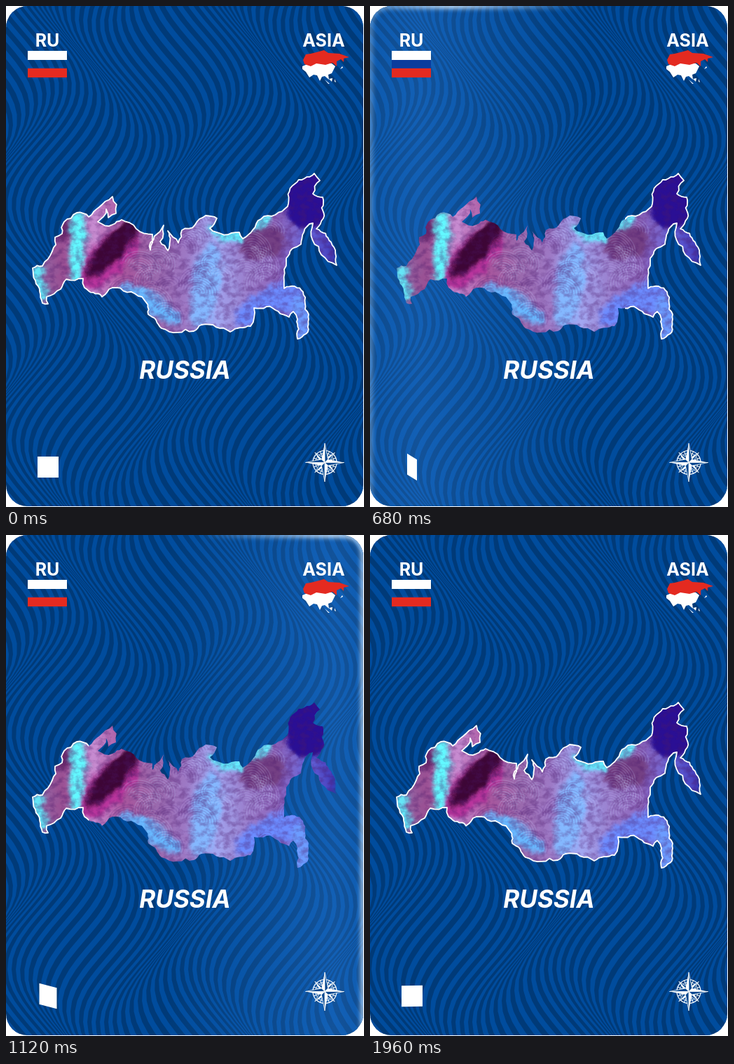
These frames come from a looping animation (511 px wide and 715 px high, 2000 ms). An HTML page:

```html
<!DOCTYPE html>
<html lang="en">
<head>
<meta charset="utf-8">
<title>Country card</title>
<style>
  html, body { margin: 0; width: 100%; height: 100%; overflow: hidden; background: #fff; }
  svg { display: block; position: absolute; left: 0; top: 0; }
  text { font-family: Montserrat, Inter, "Open Sans", sans-serif; font-weight: 700; fill: #fff; text-anchor: middle; }
</style>
</head>
<body>
<svg width="511" height="715" viewBox="0 0 511 715">
  <defs>
    <clipPath id="cardClip"><rect width="510" height="714" rx="31"/></clipPath>
    <clipPath id="landClip"><path class="coast"/></clipPath>
    <clipPath id="wipe"><rect id="wipeBox" y="220" height="270"/></clipPath>
    <linearGradient id="sheen" gradientUnits="userSpaceOnUse" y1="0" y2="0">
      <stop offset="0" stop-color="#4a9cff" stop-opacity="0"/>
      <stop offset=".5" stop-color="#4a9cff" stop-opacity=".25"/>
      <stop offset="1" stop-color="#4a9cff" stop-opacity="0"/>
    </linearGradient>
    <linearGradient id="rim" gradientUnits="userSpaceOnUse" y1="0" y2="0">
      <stop offset="0" stop-color="#cfe8ff" stop-opacity="0"/>
      <stop offset=".5" stop-color="#e4f3ff" stop-opacity=".95"/>
      <stop offset="1" stop-color="#cfe8ff" stop-opacity="0"/>
    </linearGradient>
    <linearGradient id="tones"></linearGradient>
    <filter id="soft" filterUnits="userSpaceOnUse" x="-20" y="-20" width="551" height="755">
      <feGaussianBlur stdDeviation="3"/>
    </filter>
    <filter id="marble" filterUnits="userSpaceOnUse" x="10" y="210" width="490" height="290" color-interpolation-filters="sRGB">
      <feGaussianBlur stdDeviation="3" result="blur"/>
      <feTurbulence type="fractalNoise" baseFrequency=".05" numOctaves="4" seed="7"/>
      <feDisplacementMap in="blur" scale="16" xChannelSelector="R" yChannelSelector="G"/>
    </filter>
    <filter id="grain" filterUnits="userSpaceOnUse" x="30" y="230" width="450" height="255" color-interpolation-filters="sRGB">
      <feTurbulence type="fractalNoise" baseFrequency=".1 .13" numOctaves="3" seed="12"/>
      <feColorMatrix values="0 0 0 0 .3  0 0 0 0 .1  0 0 0 0 .42  3 0 0 0 -1.2"/>
    </filter>
  </defs>

  <g clip-path="url(#cardClip)">
    <rect width="510" height="714" fill="#003a78"/>
    <path id="waves" fill="#004c9d"/>
    <rect width="510" height="714" fill="url(#sheen)"/>
    <path d="M0 714V31Q0 0 31 0H479Q510 0 510 31V714" fill="none" stroke="url(#rim)" stroke-width="7" filter="url(#soft)"/>
  </g>

  <text x="59" y="58" font-size="25">RU</text>
  <text x="453.5" y="58" font-size="25">ASIA</text>
  <text x="255.5" y="531.5" font-size="35" font-style="italic">RUSSIA</text>

  <path d="M31 64h56v13H31z" fill="#fff"/>
  <path id="flagBand" d="M31 77h56v12H31z" fill="#0b3c9d"/>
  <path d="M31 89h56v13H31z" fill="#e42a20"/>

  <path fill="#fff" d="M423 86l12-5 30 1 5 4-5 10-5 2 1 7-6-5-4 1-3 6-4-8-5-1-6 4-5-8-5-4z
    M456 103l6 5M461 104l5-1-1 5zM455 105l7 6-2 0zM469 104l2 5-2-1zM477 90l3-4 1 2zM463 111l7 0"/>
  <path fill="#e42a20" d="M424 77l4-8 7-1 8-2 11-3 6 4 16 1 14 5-8 2 0 5-4-4-6 3 0 7-6-5-10 3-13-2-8 4-9-3z"/>

  <g clip-path="url(#landClip)">
    <g id="paint" filter="url(#marble)">
      <rect x="38" y="220" width="435" height="270" fill="url(#tones)"/>
    </g>
    <g id="ridges" fill="none" stroke-width="1.2"></g>
    <rect x="30" y="230" width="450" height="255" filter="url(#grain)" opacity=".35"/>
  </g>
  <path class="coast" clip-path="url(#wipe)" fill="none" stroke="#fff" stroke-width="1.8" stroke-linejoin="round"/>

  <rect id="badge" x="-15" y="-15" width="30" height="30" fill="#fff"/>
  <g id="compass" transform="translate(455 651.5)"></g>
</svg>

<script>
const LOOP = 2000, STEP = 40, TAU = Math.PI * 2;
const $ = id => document.getElementById(id);

function add(parent, tag, attrs) {
  const el = document.createElementNS("http://www.w3.org/2000/svg", tag);
  for (const key in attrs) el.setAttribute(key, attrs[key]);
  parent.appendChild(el);
  return el;
}

function seeded(seed) {
  return () => (seed = (seed * 16807) % 2147483647) / 2147483647;
}

// Main capes and bays, clockwise from the west; roughen() adds the small coves
const capes = `38,374 52,371 66,350 70,330 80,325 83,308 101,295 118,301 133,287 152,272 157,296
  146,302 143,290 131,308 152,312 165,305 209,326 206,348 225,313 220,336 231,349 231,321 246,338
  251,320 285,299 301,303 291,317 333,323 338,332 364,304 402,286 412,254 440,239 448,249 438,268
  452,273 453,303 443,318 464,337 472,370 450,355 438,310 421,340 400,360 397,403 412,400 424,408
  432,440 428,468 416,475 416,447 410,436 404,444 372,429 354,431 349,457 320,465 279,455 268,464
  222,460 203,440 194,415 152,402 137,415 112,402 110,389 86,390 78,404 58,415 60,425 52,424 42,392`;

function roughen(a, b, random) {
  const dx = b[0] - a[0], dy = b[1] - a[1];
  if (Math.hypot(dx, dy) < 7) return [a];
  const bend = (random() - .5) * .32;
  const mid = [a[0] + dx / 2 - dy * bend, a[1] + dy / 2 + dx * bend];
  return [...roughen(a, mid, random), ...roughen(mid, b, random)];
}

function drawCoast() {
  const random = seeded(21);
  const points = capes.trim().split(/\s+/).map(pair => pair.split(",").map(Number));
  const coast = points.flatMap((p, i) => roughen(p, points[(i + 1) % points.length], random));
  const d = `M${coast.map(p => p.map(v => v.toFixed(1))).join("L")}Z`;
  for (const path of document.querySelectorAll(".coast")) path.setAttribute("d", d);
}

// Swaying stripes whose phase drifts across the card, so they bunch up on alternate slopes
function drawWaves() {
  const pitch = 12, span = 264, period = 336, sway = 46, drift = .74;
  const point = (c, y) => {
    const shift = drift * Math.cos(TAU * (c - 243) / span + Math.PI / 2);
    const x = c - sway * Math.sin(TAU * (y - 238) / period - shift);
    return `${x.toFixed(1)} ${y}`;
  };
  let d = "";
  for (let c = -72; c < 590; c += pitch) {
    const left = [], right = [];
    for (let y = -10; y <= 725; y += 15) {
      left.push(point(c, y));
      right.unshift(point(c + pitch / 2, y));
    }
    d += `M${left.join("L")}L${right.join("L")}Z`;
  }
  $("waves").setAttribute("d", d);
}

function paintLand() {
  const tones = ["#8d6aa8", "#9a4f92", "#c98fd4", "#a8559c", "#9a68ac", "#9d78c4",
    "#a2aaf4", "#9a7ecc", "#8c62b8", "#6a68dc", "#3c34b4"];
  tones.forEach((color, i) =>
    add($("tones"), "stop", { offset: i / (tones.length - 1), "stop-color": color }));

  const blob = (fill, cx, cy, rx, ry, turn = 0) =>
    add($("paint"), "ellipse", { fill, cx, cy, rx, ry, transform: `rotate(${turn} ${cx} ${cy})` });
  blob("#64e8f8", 46, 400, 12, 30);
  blob("#6a2a6c", 78, 318, 14, 16);
  add($("paint"), "path", { d: "M92 290h22l-3 104h-20z", fill: "#62f8ff" });
  blob("#b8349c", 148, 358, 26, 56, 40);
  blob("#3d0636", 152, 346, 17, 52, 42);
  blob("#68b8ff", 205, 425, 50, 15, 30);
  blob("#84b8ff", 285, 400, 20, 60, 10);
  blob("#62eeff", 322, 325, 36, 10, 12);
  blob("#62eeff", 362, 306, 20, 10, -30);
  blob("#744084", 368, 338, 34, 22, -20);
  blob("#6c8cff", 375, 425, 55, 22, -30);
  blob("#2a0f94", 430, 275, 34, 44);
  blob("#6c9cff", 422, 445, 18, 34);

  // Curled ridges
  const random = seeded(5);
  for (let i = 0; i < 34; i++) {
    const x = 170 + 260 * random(), y = 310 + 145 * random(), size = 12 + 20 * random();
    const turn = random() * 120 - 60;
    for (let r = 4; r < size; r += 4)
      add($("ridges"), "path", {
        d: `M${-r} 0A${r} ${r * .8} 0 0 1 ${r} 0`,
        stroke: i % 2 ? "#c8d4ff" : "#5a2c88", "stroke-opacity": .2,
        transform: `translate(${x} ${y}) rotate(${turn})`
      });
  }
}

function drawCompass() {
  const rose = $("compass");
  const ring = (r, width) => add(rose, "circle", { r, fill: "none", stroke: "#fff", "stroke-width": width });
  const star = (length, waist, offset) => {
    for (let angle = offset; angle < 360; angle += 90) {
      const transform = `rotate(${angle})`;
      add(rose, "path", { d: `M0 0L${-waist} ${-waist}L0 ${-length}Z`, fill: "#fff", transform });
      add(rose, "path", { d: `M0 0L${waist} ${-waist}L0 ${-length}Z`, fill: "#00458e", stroke: "#fff", "stroke-width": .8, transform });
    }
  };
  ring(17, 1.2);
  ring(13.5, .8);
  for (let angle = 0; angle < 360; angle += 22.5)
    add(rose, "path", { d: "M0-6V-17", stroke: "#fff", "stroke-width": .9, transform: `rotate(${angle})` });
  star(20, 4, 45);
  star(27.5, 4.6, 0);
}

function placeGradient(id, center, reach) {
  $(id).setAttribute("x1", center - reach);
  $(id).setAttribute("x2", center + reach);
}

// Half a turn that gathers speed, then half a turn that eases out
function spinAngle(t) {
  const u = t / (LOOP / 2);
  return Math.PI * (u < 1 ? u ** 1.1 : 1 + Math.sin((u - 1) * Math.PI / 2));
}

function render(t) {
  placeGradient("sheen", 180 + (t - 800) * .9, 240);
  placeGradient("rim", 20 + (t - 560) * .8, 190);

  // The outline is wiped away, then drawn again, both from the left
  const hiding = t < 905;
  const edge = Math.max(0, hiding ? t * .55 - 10 : (t - 905) * .55);
  $("wipeBox").setAttribute("x", hiding ? edge : 0);
  $("wipeBox").setAttribute("width", hiding ? 600 : edge);

  $("flagBand").setAttribute("visibility", t >= 40 && t < 880 ? "visible" : "hidden");

  const angle = spinAngle(t);
  const skew = -.3 * Math.sqrt(Math.abs(Math.sin(angle)));
  $("badge").setAttribute("transform", `matrix(${Math.cos(angle)} ${skew} 0 1 60 658)`);
}

drawCoast();
drawWaves();
paintLand();
drawCompass();
const start = performance.now();
function tick() {
  const t = (performance.now() - start) % LOOP;
  render(Math.floor(t / STEP) * STEP);
  requestAnimationFrame(tick);
}
tick();
</script>
</body>
</html>
```
